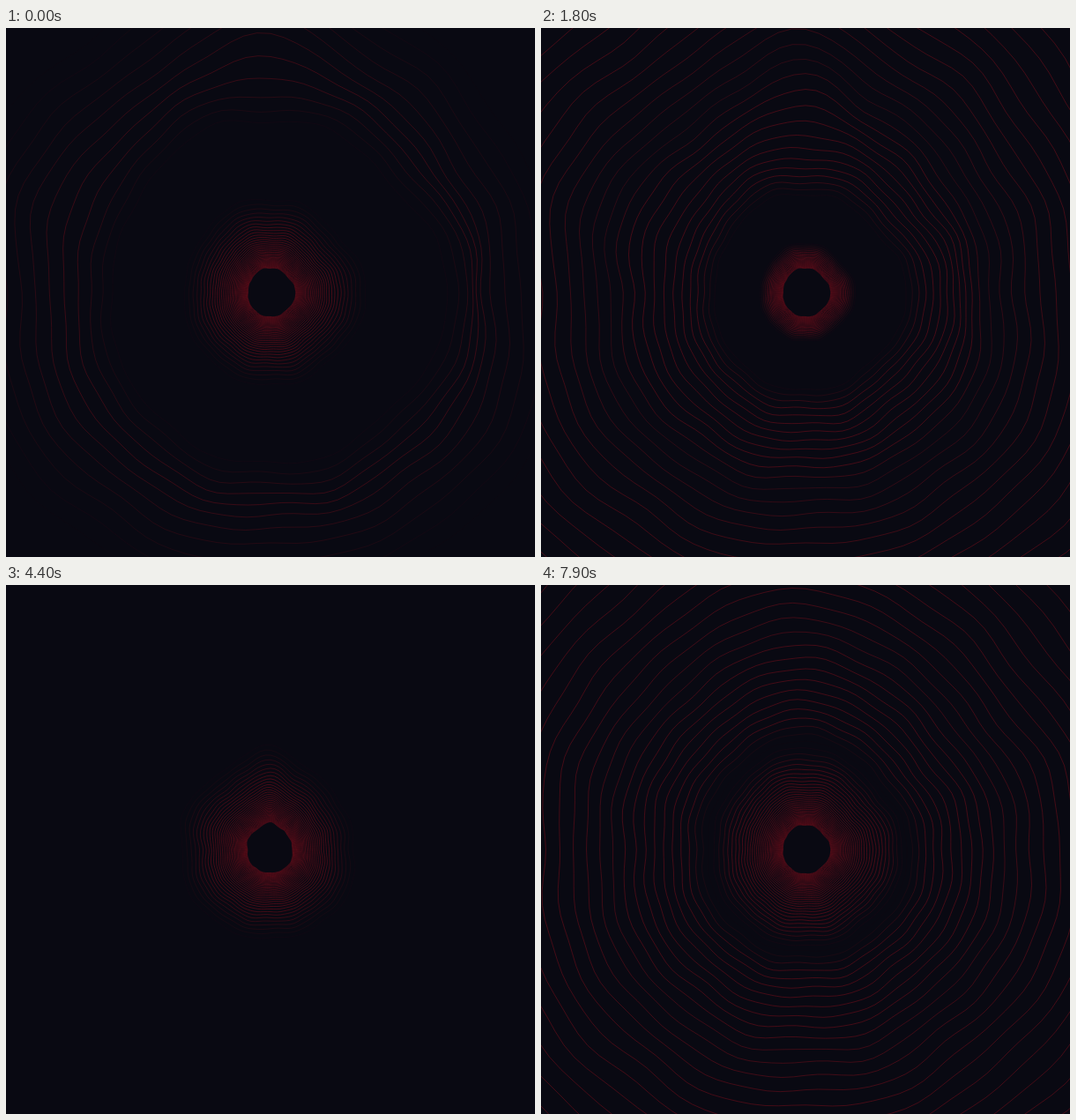
An HTML page with a canvas that plays this animation: 600 by 600 pixels, repeating every 8 s.

```html
<!DOCTYPE html>
<html>
<head>
<meta charset="utf-8">
<style>
  html, body { margin: 0; width: 100%; height: 100%; overflow: hidden; background: #090912; }
  canvas { display: block; width: 600px; height: 600px; }
</style>
</head>
<body>
<canvas id="stage" width="600" height="600"></canvas>
<script>
const ctx = document.getElementById('stage').getContext('2d');
const LOOP = 8, STEP = 0.1, CENTER = 300, POINTS = 120, PEAK_ALPHA = 0.31;

// Relative radii at equal angles, clockwise from the top.
const peaked = [207, 180, 174, 165, 167, 163, 173, 178, 175, 178,
                174, 180, 177, 182, 180, 173, 186, 185, 180, 190].map(r => r / 181);
const round = [193, 198, 188, 184, 198, 200, 200, 192, 189, 198,
               192, 197, 190, 189, 186, 180, 182, 184, 192, 201].map(r => r / 192.5);

const clamp = x => Math.max(0, Math.min(1, x));
const smooth = x => { x = clamp(x); return x * x * (3 - 2 * x); };

function sample(shape, turn) {
  const n = shape.length, pos = turn * n, i = Math.floor(pos), f = pos - i;
  const [a, b, c, d] = [-1, 0, 1, 2].map(o => shape[(i + o + n) % n]);
  return b + f / 2 * (c - a + f * (2 * a - 5 * b + 4 * c - d + f * (3 * (b - c) + d - a)));
}

const outline = shape => Array.from({ length: POINTS }, (_, i) => sample(shape, i / POINTS));
const peakedLine = outline(peaked), roundLine = outline(round);

// Spacing grows with the radius, so the rings crowd together around the core.
const spacing = r => 0.063 * r * Math.min(1, Math.sqrt(r / 150));
const rings = [];
for (let r = 181; r > 27; r -= spacing(r)) rings.push(r);
for (let r = 181 + spacing(181); r < 480; r += spacing(r)) rings.push(r);

// The lit zone opens at mid radius and spreads both ways, and also from the core.
function birth(r, pulse) {
  let start;
  if (r > 238) start = -0.5 + (r - 238) * 0.0035;
  else if (r > 180) start = -0.5 + (238 - r) * 0.0078;
  else start = (31800 - r * r) / 12000;
  return Math.min(start, pulse.core + (r - 28) * pulse.coreRate);
}

function death(r) {
  return r < 225 ? 5.1 - r * r / 18250 : 2.33 + (r - 225) * 0.0065;
}

function glow(r, t, pulse) {
  const rise = smooth((t - birth(r, pulse)) / 0.65);
  const fall = smooth((death(r) - t) / (0.25 + r / 300));
  return PEAK_ALPHA * rise * fall;
}

// How far a ring has taken the peaked shape.
const sharpen = (r, t) =>
  smooth((t - 0.4 - (36100 - r * r) / 12500) / (0.8 + r / 130));
const soften = (r, t) =>
  (1 - 0.55 * smooth(t / 1.6)) * smooth((r - 70) / 60);

const pulses = [
  { start: -4.4, core: 0.6, coreRate: 0.04, mix: () => 0 },
  { start: 0, core: 0.6, coreRate: 0.04, mix: sharpen },
  { start: 6.3, core: -0.2, coreRate: 0.02, mix: soften }
];

function drawRing(r, mix, alpha) {
  const shift = Math.log(r) * 13;
  ctx.strokeStyle = `rgba(200, 18, 34, ${alpha})`;
  ctx.beginPath();
  for (let i = 0; i < POINTS; i++) {
    const angle = i / POINTS * Math.PI * 2;
    const ripple = 0.004 * Math.sin(13 * angle + shift) + 0.003 * Math.sin(21 * angle - shift);
    const d = r * (roundLine[i] + (peakedLine[i] - roundLine[i]) * mix + ripple);
    ctx.lineTo(CENTER + d * Math.sin(angle), CENTER - d * Math.cos(angle));
  }
  ctx.closePath();
  ctx.stroke();
}

function draw(time) {
  ctx.fillStyle = '#090912';
  ctx.fillRect(0, 0, 600, 600);
  ctx.lineWidth = 1;
  for (const pulse of pulses) {
    const t = time - pulse.start;
    if (t < -STEP / 2) continue;
    for (const r of rings) {
      const alpha = glow(r, t, pulse);
      if (alpha > 0.008) drawRing(r, pulse.mix(r, t), alpha);
    }
  }
}

function frame() {
  const time = performance.now() / 1000 % LOOP;
  draw(Math.floor(time / STEP + 1e-6) * STEP);
  requestAnimationFrame(frame);
}
frame();
</script>
</body>
</html>
```
